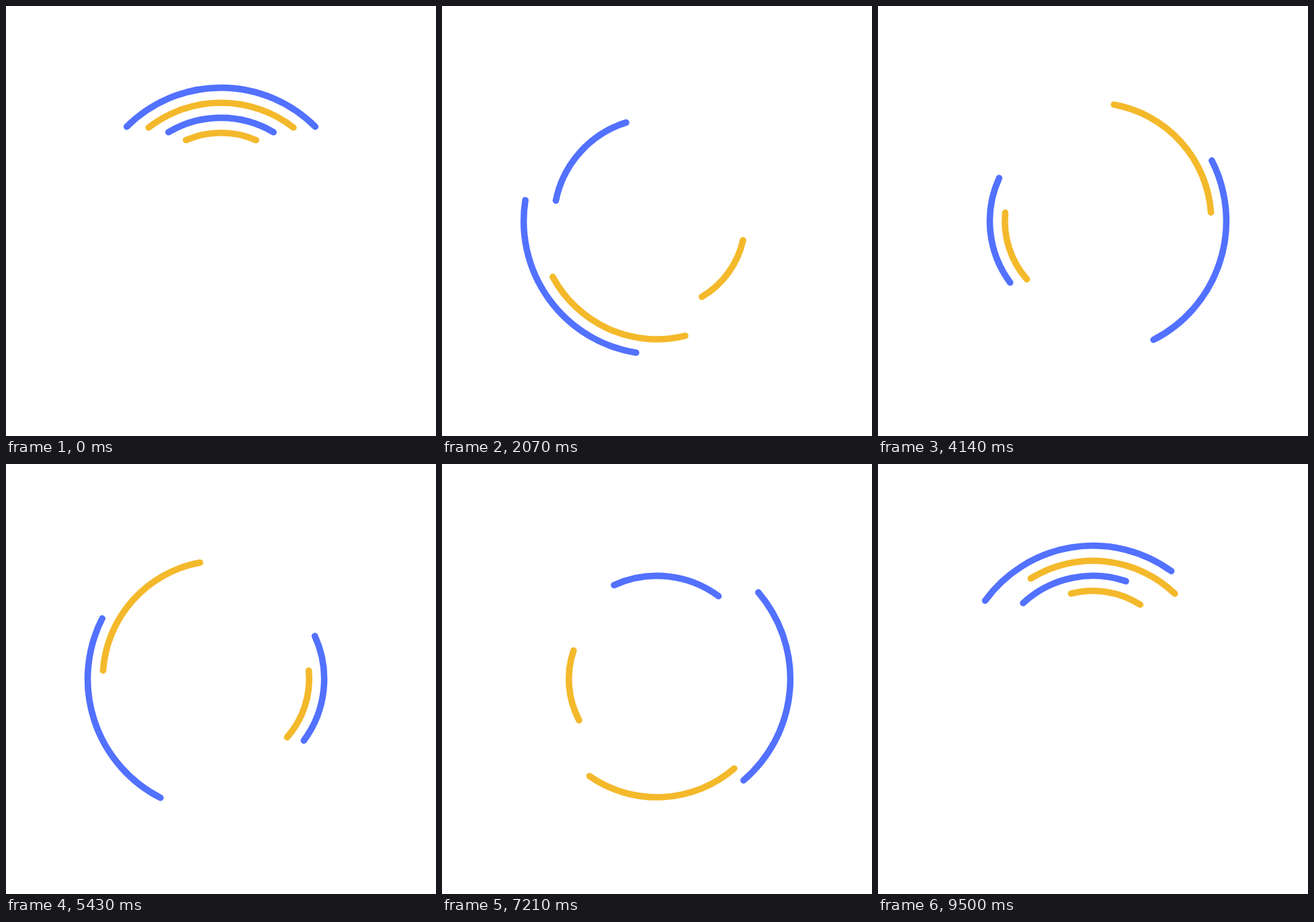
An HTML page for the animation above (9570 ms loop, 640 by 640 pixels).

```html
<!DOCTYPE html>
<html lang="en">
<head>
<meta charset="utf-8">
<title>Spinning arcs</title>
<style>
  html, body { margin: 0; width: 100%; height: 100%; overflow: hidden; background: #fff; }
  svg { display: block; width: 100%; height: 100%; }
</style>
</head>
<body>
<svg viewBox="0 0 640 640" fill="none" stroke-width="9.6" stroke-linecap="round"></svg>
<script>
const LOOP = 9570;     // ms
const STEPS = 240;     // animation steps per loop, 25 per second
const CENTER = 320;
const BLUE = '#5271ff';
const YELLOW = '#f4b92b';

// share: part of the full circle; turns: signed rotations per loop
const rings = [
  { r: 198.4, share: 0.25, turns: 3, color: BLUE },
  { r: 176, share: 0.21, turns: -2, color: YELLOW },
  { r: 153.6, share: 0.17, turns: 4, color: BLUE },
  { r: 131.2, share: 0.13, turns: -3, color: YELLOW }
];

const svg = document.querySelector('svg');

for (const ring of rings) {
  const half = ring.share * Math.PI;
  const dx = ring.r * Math.sin(half);
  const y = CENTER - ring.r * Math.cos(half);
  ring.el = document.createElementNS(svg.namespaceURI, 'path');
  ring.el.setAttribute('d',
    `M${CENTER - dx} ${y}A${ring.r} ${ring.r} 0 0 1 ${CENTER + dx} ${y}`);
  ring.el.setAttribute('stroke', ring.color);
  svg.append(ring.el);
}

// The picture changes 14 times a second, on a 10 ms clock.
function stepAt(ms) {
  const tick = Math.floor(0.14 * (Math.floor(ms / 10) + 0.5));
  return Math.floor((tick + 0.5) * 25 / 14);
}

function draw(ms) {
  const step = stepAt(ms % LOOP);
  for (const { el, turns } of rings) {
    const angle = 360 * turns * step / STEPS;
    el.setAttribute('transform', `rotate(${angle} ${CENTER} ${CENTER})`);
  }
}

const start = performance.now();
function loop() {
  draw(performance.now() - start);
  requestAnimationFrame(loop);
}
loop();
</script>
</body>
</html>
```
